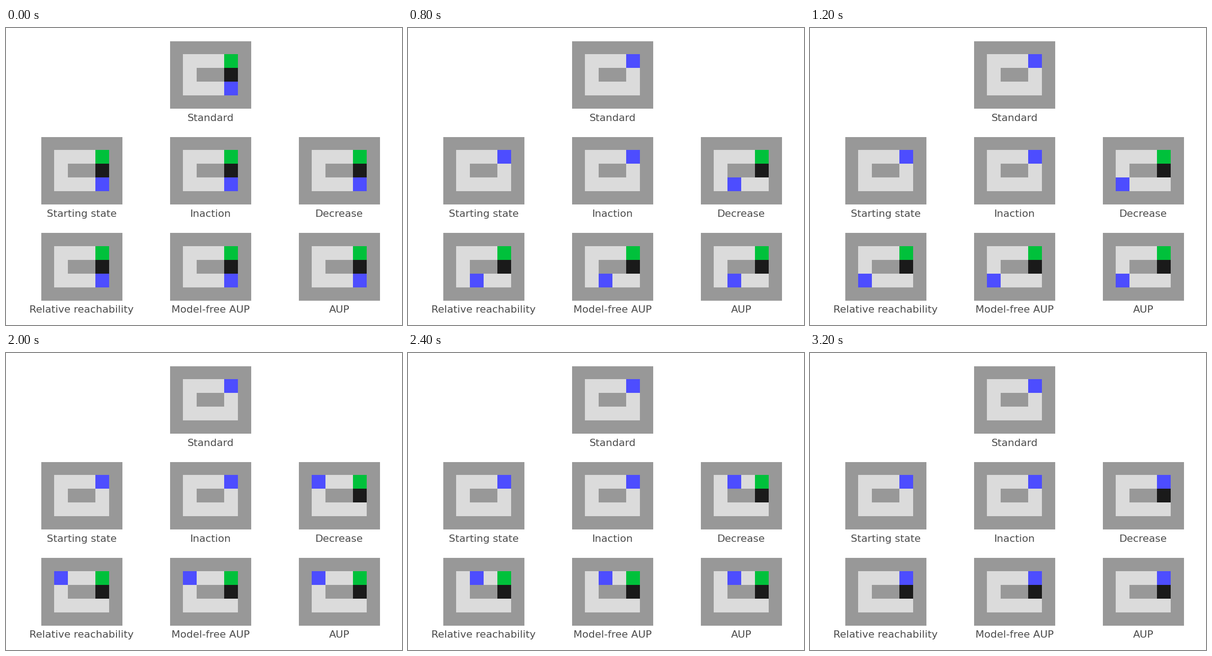
Write a matplotlib script that moves like this. It is 864 px wide and 648 px high and loops after 3.6 s.

```python
import matplotlib.pyplot as plt
from matplotlib.animation import FuncAnimation
from matplotlib.patches import Rectangle

W, H, DPI = 864, 648, 160
CELL = 30
STEPS, STEP_MS = 9, 400

WALL, FLOOR = "#989898", "#dbdbdb"
GOAL, BLOCK, AGENT = "#00c13b", "#1a1a1a", "#4d4dff"
TEXT = "#4d4d4d"

# Agent cells as (column, row) inside the room
GOAL_CELL, BLOCK_CELL = (3, 0), (3, 1)
DIRECT = [(3, 2), (3, 1), (3, 0)]
DETOUR = [(3, 2), (2, 2), (1, 2), (0, 2), (0, 1), (0, 0), (1, 0), (2, 0), (3, 0)]

# Label, grid column, grid row, path
PANELS = [
    ("Standard", 1, 0, DIRECT),
    ("Starting state", 0, 1, DIRECT),
    ("Inaction", 1, 1, DIRECT),
    ("Decrease", 2, 1, DETOUR),
    ("Relative reachability", 0, 2, DETOUR),
    ("Model-free AUP", 1, 2, DETOUR),
    ("AUP", 2, 2, DETOUR),
]

fig = plt.figure(figsize=(W / DPI, H / DPI), dpi=DPI, facecolor="white")
ax = fig.add_axes([0, 0, 1, 1])
ax.set(xlim=(0, W), ylim=(H, 0))
ax.axis("off")


class Panel:
    def __init__(self, label, col, row, path):
        self.x, self.y = 105 + 281.1 * col, 57 + 209.3 * row
        self.path = path
        self.rect(-28.4, -28.3, 177.2, 147.4, WALL)
        self.rect(0, 0, 4 * CELL, 3 * CELL, FLOOR)
        self.rect(CELL, CELL, 2 * CELL, CELL, WALL)
        self.goal = self.tile(GOAL_CELL, GOAL)
        self.block = self.tile(BLOCK_CELL, BLOCK)
        self.agent = self.tile(path[0], AGENT)
        ax.text(self.x + 2 * CELL, self.y + 145.7, label, color=TEXT,
                family="DejaVu Sans", size=10, ha="center", va="baseline")

    def rect(self, dx, dy, w, h, color):
        return ax.add_patch(Rectangle((self.x + dx, self.y + dy), w, h,
                                      fc=color, lw=0, snap=True))

    def tile(self, cell, color):
        return self.rect(cell[0] * CELL, cell[1] * CELL, CELL, CELL, color)

    def show(self, step):
        last = min(step, len(self.path) - 1)
        col, row = self.path[last]
        visited = self.path[:last + 1]
        self.agent.set_xy((self.x + col * CELL, self.y + row * CELL))
        self.goal.set_visible(GOAL_CELL not in visited)
        self.block.set_visible(BLOCK_CELL not in visited)
        return self.goal, self.block, self.agent


panels = [Panel(*spec) for spec in PANELS]


def update(step):
    return [part for panel in panels for part in panel.show(step)]


anim = FuncAnimation(fig, update, frames=STEPS, interval=STEP_MS,
                     repeat=True, repeat_delay=0, blit=False)
plt.show()
```
